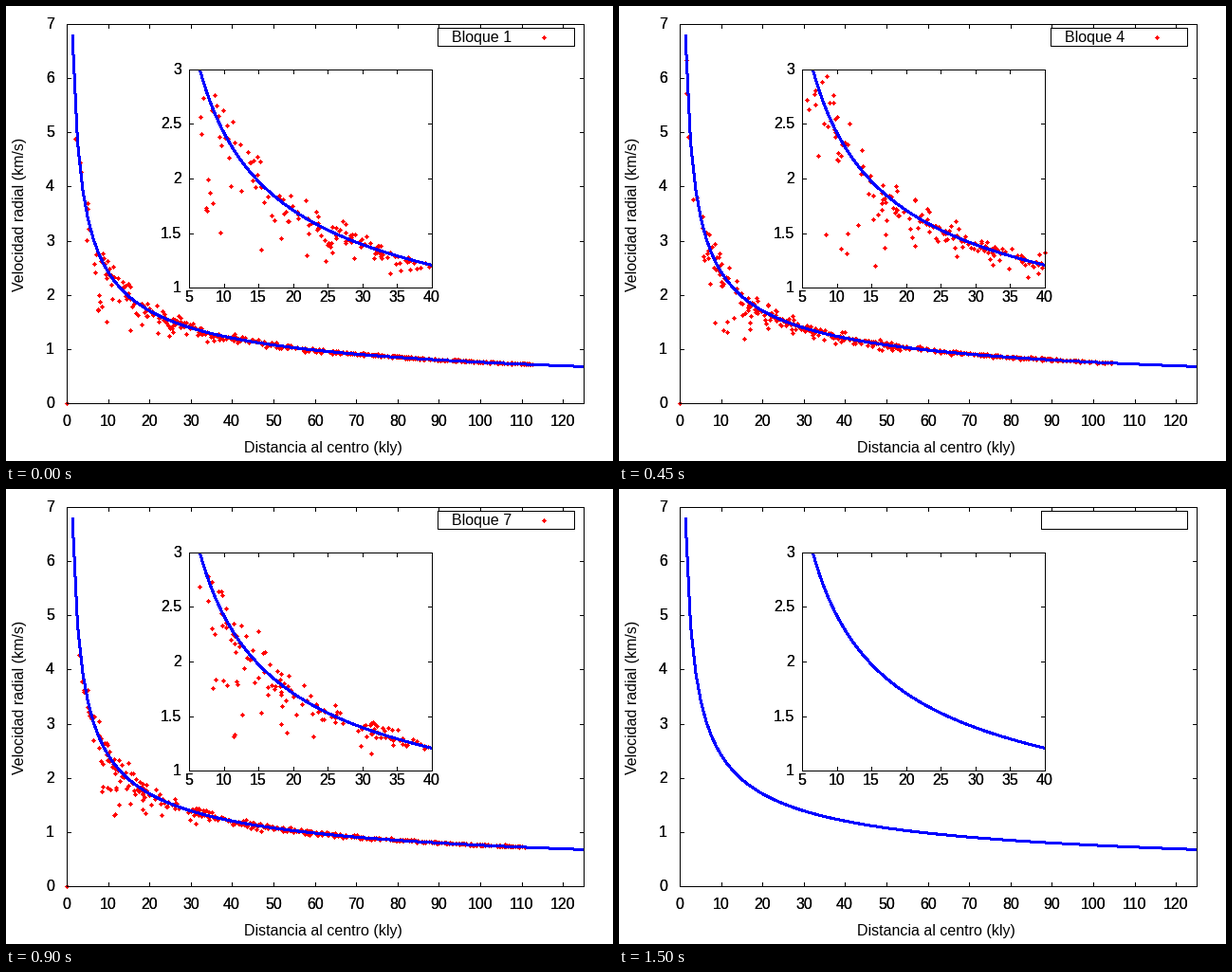
Animation, 640 px wide and 480 px high, one loop 1650 ms. Source, as a matplotlib script:

```python
import numpy as np
import matplotlib.pyplot as plt
from matplotlib.animation import FuncAnimation
from matplotlib.collections import LineCollection, PolyCollection

DPI = 100
PX = 72 / DPI
BLOCKS = 10
K = 7.65  # speed falls off as K / sqrt(distance)

plt.rcParams["font.family"] = "Liberation Sans"
plt.rcParams["font.size"] = 16 * PX

# Whole coordinates are pixel centres, with y running down
fig = plt.figure(figsize=(6.4, 4.8), dpi=DPI, facecolor="white")
ax = fig.add_axes([0, 0, 1, 1])
ax.set_xlim(-0.5, 639.5)
ax.set_ylim(479.5, -0.5)
ax.axis("off")


def speed(r):
    return K / np.sqrt(r)


def stars(block):
    """Distances and speeds of one block, starting with the origin."""
    rng = np.random.default_rng(40 + block)
    reach = rng.uniform(104, 113)
    r = 5 + (reach - 5) * rng.random(440)
    near = rng.uniform(1.5, 5, 5)
    slow = rng.uniform(7, 17, 7)

    lag = 0.4 * np.exp(-r / 30) * rng.random(r.size) * (rng.random(r.size) < 0.17)
    factor = 1 + rng.normal(0, 0.085 * np.exp(-r / 30) + 0.006) - lag
    r = np.concatenate([near, slow, r])
    factor = np.concatenate([rng.uniform(0.85, 1.08, near.size),
                             rng.uniform(0.55, 0.8, slow.size), factor])
    return np.vstack([(0, 0), np.column_stack([r, speed(r) * factor])])


def diamonds(centres):
    # Every pixel touched is filled, so this covers five pixels across
    shape = 1.8 * np.array([(0, 1), (1, 0), (0, -1), (-1, 0)])
    return np.round(centres)[:, None, :] + shape


def add_dots(centres=None):
    verts = [] if centres is None else diamonds(centres)
    dots = PolyCollection(verts, facecolors="red", edgecolors="none", linewidths=0,
                          antialiaseds=False, zorder=2, snap=False)
    ax.add_collection(dots)
    return dots


def add_lines(segments):
    lines = LineCollection(segments, colors="black", linewidths=PX,
                           capstyle="projecting", zorder=4, snap=False)
    ax.add_collection(lines)
    return lines


def box(x0, y0, x1, y1):
    return [(x0, y0), (x1, y0), (x1, y1), (x0, y1), (x0, y0)]


def label(x, y, text, align="center", **kw):
    return ax.text(x - 0.5, y - 0.5, text, ha=align, va="baseline", **kw)


def tick_label(x, y, value, align="center"):
    # Printed twice, which gives the heavier edges
    for _ in range(2):
        label(x, y, f"{value:g}", align)


class Panel:
    """A plot frame given by its left, right, top and bottom pixels."""

    def __init__(self, edges, xlim, ylim, xticks, yticks, label_x, label_y):
        self.edges, self.xlim, self.ylim = edges, xlim, ylim
        left, right, top, bottom = edges
        lines = [box(left, top, right, bottom)]
        for value in xticks:
            x = round(self.to_px([(value, ylim[0])])[0, 0])
            lines += [[(x, bottom), (x, bottom - 4)], [(x, top), (x, top + 4)]]
            tick_label(x, label_y, value)
        for value in yticks:
            y = round(self.to_px([(xlim[0], value)])[0, 1])
            lines += [[(left, y), (left + 4, y)], [(right, y), (right - 4, y)]]
            tick_label(label_x, y + 5, value, "right")
        add_lines(lines)

        x = np.linspace(*xlim, 100)
        x = x[x > 0]
        curve, = ax.plot(*self.to_px(np.column_stack([x, speed(x)])).T,
                         color="blue", lw=2 * PX, antialiased=False,
                         solid_capstyle="butt", zorder=3)
        curve.set_clip_path(plt.Rectangle((left, top), right - left, bottom - top,
                                          transform=ax.transData))
        self.dots = add_dots()

    def to_px(self, points):
        x, y = np.asarray(points, float).T
        left, right, top, bottom = self.edges
        (x0, x1), (y0, y1) = self.xlim, self.ylim
        return np.column_stack([left + (x - x0) * (right - left) / (x1 - x0),
                                bottom - (y - y0) * (bottom - top) / (y1 - y0)])

    def show(self, points):
        x, y = points.T
        inside = ((x >= self.xlim[0]) & (x <= self.xlim[1])
                  & (y >= self.ylim[0]) & (y <= self.ylim[1]))
        self.dots.set_verts(diamonds(self.to_px(points[inside])))


panels = [
    Panel((64, 609, 19, 419), (0, 125), (0, 7),
          range(0, 121, 10), range(8), 51, 443),
    Panel((193, 449, 67, 297), (5, 40), (1, 3),
          range(5, 41, 5), np.arange(1, 3.1, 0.5), 185, 312),
]
label(334.5, 471, "Distancia al centro (kly)")
label(19, 220, "Velocidad radial (km/s)", rotation=90, rotation_mode="anchor")

key_text = label(533, 38, "", "right")
key_box = add_lines([])
key_dot = add_dots(np.array([(567, 33)]))


def draw(frame):
    block = frame + 1
    filled = block <= BLOCKS
    points = stars(block) if filled else np.empty((0, 2))
    for panel in panels:
        panel.show(points)
    key_text.set_text(f"Bloque {block}" if filled else "")
    key_dot.set_visible(filled)
    key_box.set_segments([box(455 if block < 10 else 445, 23, 599, 42)])


anim = FuncAnimation(fig, draw, frames=BLOCKS + 1, interval=150, repeat=True,
                     repeat_delay=0, blit=False)
plt.show()
```
